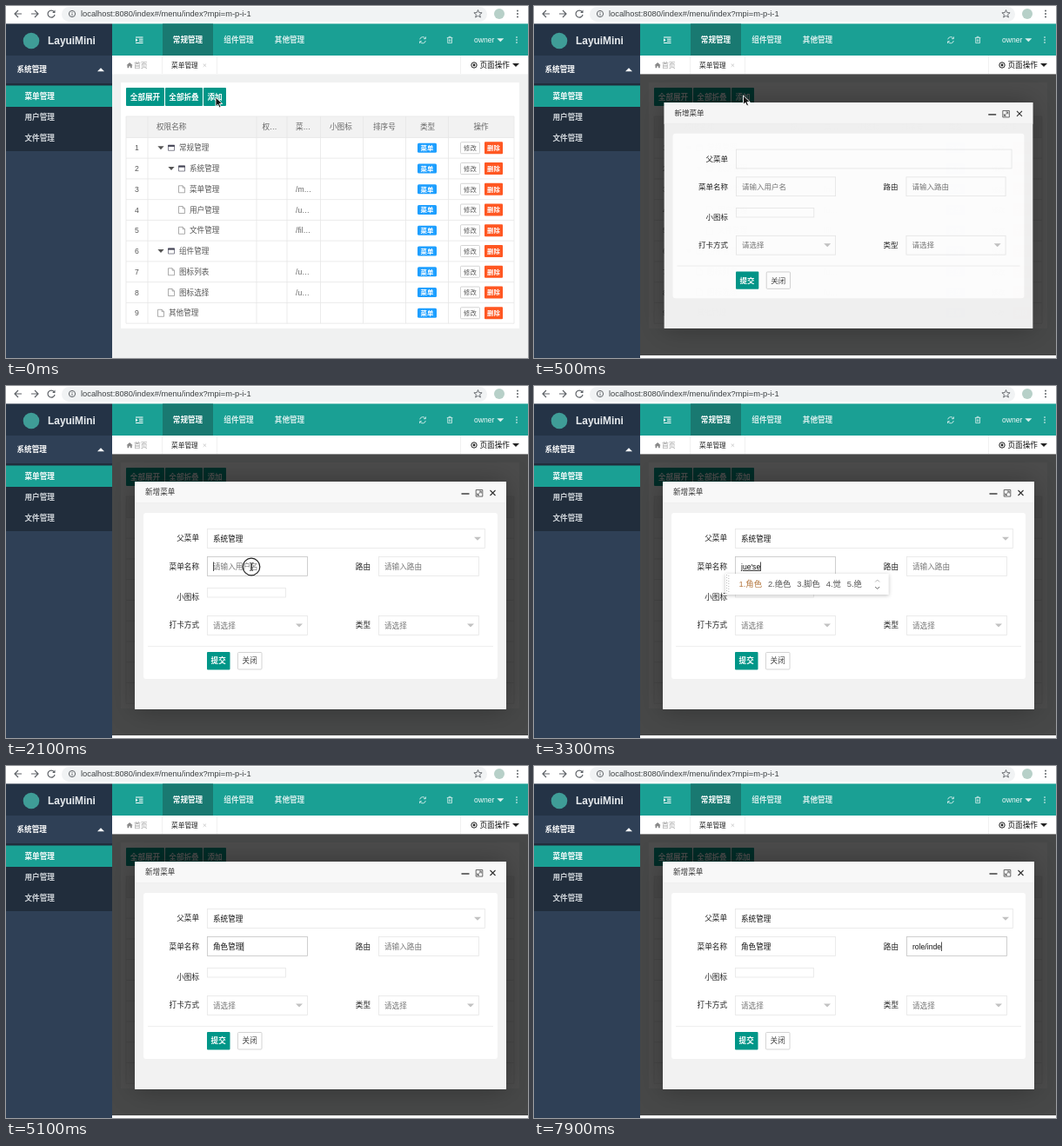
These frames come from a looping animation (600x405 px, 8 s). An HTML page:

```html
<!DOCTYPE html>
<html lang="zh-CN">
<head>
<meta charset="utf-8">
<title>菜单管理</title>
<style>
html, body { margin: 0; width: 100%; height: 100%; overflow: hidden; background: #fff; }
svg { display: block; width: 100vw; height: 100vh; }
text { font-family: "Liberation Sans", "Noto Sans CJK SC", "Noto Sans CJK", sans-serif; white-space: pre; }
.shadow { filter: drop-shadow(0 0 15px rgba(0,0,0,.3)); }
.soft { filter: drop-shadow(0 1px 2px rgba(0,0,0,.25)); }
</style>
</head>
<body>
<svg id="stage" viewBox="0 0 600 405"></svg>
<script>
const TEAL = '#009688', HEAD = '#1aa094', GREY = '#757575', LINE = '#e6e6e6';
const LOOP = 8000;

// Drawing helpers; text y is the middle of the line
const rect = (x, y, x2, y2, fill, more = '') =>
  `<rect x="${x}" y="${y}" width="${x2 - x}" height="${y2 - y}" fill="${fill}" ${more}/>`;
const box = (x, y, x2, y2, stroke = LINE, more = '') =>
  rect(x + .5, y + .5, x2 - .5, y2 - .5, '#fff', `stroke="${stroke}" stroke-width=".8" ${more}`);
const text = (x, y, s, fill = '#333', size = 8.6, more = '') =>
  `<text x="${x}" y="${y + size * .37}" fill="${fill}" font-size="${size}" ${more}>${s}</text>`;
const path = (d, stroke, width = 1, fill = 'none', more = '') =>
  `<path d="${d}" stroke="${stroke}" stroke-width="${width}" fill="${fill}" ${more}/>`;
const dot = (x, y, r, fill, more = '') => `<circle cx="${x}" cy="${y}" r="${r}" fill="${fill}" ${more}/>`;
const down = (x, y, fill, w = 4, h = 4) => path(`M${x - w} ${y - h / 2}h${2 * w}l${-w} ${h}z`, 'none', 0, fill);
const group = (id, inner, more = '') => `<g id="${id}" ${more}>${inner}</g>`;
const BOLD = ' font-weight="bold"', MID = 'text-anchor="middle"', END = 'text-anchor="end"';

// name, depth, is folder, route
const tree = [
  ['常规管理', 0, 1], ['系统管理', 1, 1], ['菜单管理', 2, 0, '/m…'], ['用户管理', 2, 0, '/u…'],
  ['文件管理', 2, 0, '/fil…'], ['组件管理', 0, 1], ['图标列表', 1, 0, '/u…'],
  ['图标选择', 1, 0, '/u…'], ['其他管理', 0, 0]
];

function browser() {
  const ink = '#5f6368';
  return rect(0, 0, 600, 20.4, '#fff') + rect(64, 1, 553, 18, '#f1f3f4', 'rx="8.5"') +
    path('M18 9h-8m4-4l-4 4 4 4', ink, 1.2) + path('M29 9h8m-4-4l4 4-4 4', ink, 1.2) +
    path('M55.2 6.6a4 4 0 1 0 .8 3.2', ink, 1.2) + path('M56.5 4.5v3.4h-3.4z', 'none', 0, ink) +
    dot(76, 9, 3.6, 'none', `stroke="${ink}"`) + path('M76 8.5v2.6m0-4.2v1', ink, .9) +
    text(86, 9, 'localhost:8080/index#/menu/index?mpi=m-p-i-1', '#3c4043', 9.3) +
    path('M0-4.5L1.3-1.4 4.6-1.2 2 .9 2.9 4.1 0 2.3-2.9 4.1-2 .9-4.6-1.2-1.3-1.4Z', ink, .9, 'none', 'transform="translate(542.5 9)"') +
    dot(567, 9, 6, '#b7d0c8') + [5.5, 9, 12.5].map(y => dot(588, y, 1, ink)).join('');
}

function header() {
  const pale = '#d8efed';
  return rect(0, 20.4, 122, 57, '#243346') + dot(29, 40, 9.3, '#3f9d97') +
    text(48, 39.5, 'LayuiMini', '#e9edf0', 11.9, BOLD) +
    rect(122, 20.4, 600, 57, HEAD) + rect(180, 20.4, 238, 57, '#197971') +
    path('M149 36h8.5m-4.5 2.2h4.5m-4.5 2.1h4.5m-8.5 2.2h8.5', '#fff', 1) +
    path('M149 37.3v4l2.6-2z', 'none', 0, '#fff') +
    ['常规管理', '组件管理', '其他管理'].map((s, i) =>
      text(209 + 58.5 * i, 39, s, i ? pale : '#fff', 8.6, MID + BOLD)).join('') +
    path('M475.7 38.4a3.4 3.4 0 0 1 6.2-1.2m.4 2.8a3.4 3.4 0 0 1-6.2 1.3M482.4 35.4v2.3h-2.3m-4.5 5.3v-2.3h2.3', pale, .9) +
    path('M506.8 36.6h6.6m-4.4 0v-1.3h2.2v1.3m-3.5 0v6h4.8v-6m-3.2 1.6v3m1.6-3v3', pale, .8) +
    text(538, 39, 'owner', '#eef8f7') + down(568.3, 39.3, pale) +
    [36, 39, 42].map(y => dot(587, y, .8, '#fff')).join('');
}

function sidebar() {
  return rect(0, 57, 122, 405, '#2f4056') + rect(0, 89, 122, 167, '#212d3c') + rect(0, 91.5, 122, 116, HEAD) +
    text(12.5, 73, '系统管理', '#fff', 8.6, BOLD) + path('M105 75.2h8l-4-4z', 'none', 0, '#fff') +
    ['菜单管理', '用户管理', '文件管理'].map((s, i) =>
      text(21.5, 103.5 + 24.3 * i, s, i ? '#d3d8dd' : '#fff', 8.6, BOLD)).join('');
}

function tabs() {
  return rect(122, 57, 600, 78.4, '#fff') +
    path('M138.5 68.3l3.6-3.2 3.6 3.2h-1v2.9h-1.8v-2h-1.6v2h-1.8v-2.9z', 'none', 0, '#888') +
    text(147, 68, '首页', '#999', 7.8) + text(190, 68, '菜单管理', '#222', 7.7) +
    path('M226.7 66.5l3.4 3.4m0-3.4l-3.4 3.4', '#c4c4c4', .8) +
    path('M179.5 57v21M242.5 57v21M522.5 57v21', '#eee', .8) +
    dot(538, 68, 3.2, 'none', 'stroke="#222"') + dot(538, 68, 1.4, '#222') +
    text(544.5, 68, '页面操作', '#111') + down(586, 68, '#222');
}

function table() {
  const top = 151.4, step = 23.75, ends = top + 9 * step;
  let s = rect(138, 127, 584, top, '#f2f2f2');
  for (let i = 0; i <= 9; i++) s += path(`M138 ${top + i * step}h446`, LINE, .8);
  s += path([138, 163, 288, 323, 361.5, 410.5, 459.5, 508.5, 584].map(x => `M${x} 127V${ends}`).join('') + 'M138 127h446', LINE, .8);
  [['权限名称', 173], ['权…', 294.5], ['菜…', 333], ['小图标', 372], ['排序号', 422], ['类型', 476], ['操作', 537.5]]
    .forEach(([n, x]) => s += text(x, 139, n, '#666'));
  tree.forEach(([name, depth, folder, route], i) => {
    const y = top + step * (i + .5), x = 178 + 12 * depth;
    s += text(150.5, y, i + 1, '#555', 8.6, MID);
    if (folder) {
      s += down(x, y, '#555', 3.6) + path(`M${x + 8.5} ${y - 3}h7v6h-7z`, '#667', .8) + rect(x + 8.2, y - 3.4, x + 15.8, y - 1.4, '#445');
    } else {
      s += path(`M${x - 3.5} ${y - 4}h4.6l2.4 2.4v5.6h-7zm4.6 0v2.4h2.4`, '#8a8a8a', .7);
    }
    s += text(x + (folder ? 21 : 9), y, name, '#555') + text(333, y, route || '', '#666') +
      rect(473, y - 5.5, 495, y + 5.5, '#1e9fff', 'rx="1.5"') + text(484, y, '菜单', '#fff', 7.4, MID + BOLD) +
      box(522, y - 7, 545, y + 7, '#c9c9c9', 'rx="1"') + text(533.5, y, '修改', '#555', 7.4, MID) +
      rect(550, y - 7, 571, y + 7, '#ff5722', 'rx="1"') + text(560.5, y, '删除', '#fff', 7.4, MID + BOLD);
  });
  return s;
}

function page() {
  return rect(122, 78, 600, 405, '#f0f1f1') + rect(132, 88, 590, 371, '#fff') +
    [['全部展开', 138, 182], ['全部折叠', 183, 226], ['添加', 227, 253]].map(([n, a, b]) =>
      rect(a, 94, b, 115, TEAL, 'rx="1"') + text((a + b) / 2, 104.5, n, '#fff', 8.6, MID + BOLD)).join('') + table();
}

function dropdown() {
  let s = rect(231.5, 198, 551.5, 346.5, '#fff', 'class="soft" stroke="#d2d2d2" stroke-width=".8"') +
    box(235, 206, 548, 227) + text(241, 216, '搜索', GREY) +
    path('M232 231.5h319', '#888', .7, 'none', 'stroke-dasharray="2 1.5"');
  tree.forEach(([name, depth, folder], i) => {
    const y = 240 + 11.7 * i, x = 239 + 11 * depth;
    s += folder
      ? down(x, y, '#555', 2.8, 3.4) + path(`M${x + 8} ${y - 3.5}h3l1 1.2h4.5v5.8h-8.5z`, '#dcc565', .6, '#f8e695')
      : path(`M${x + 8.5} ${y - 4}h4l2.2 2.2v5.6h-6.2z`, '#7d9cb8', .7, '#f3f9ff') + rect(x + 11, y, x + 14.2, y + 3, '#8fbce0');
    s += text(x + 18, y, name, '#333');
  });
  return s;
}

function dialog() {
  const labels = [['父菜单', 222, 175], ['菜单名称', 222, 207.5], ['路由', 419, 207.5],
    ['小图标', 222, 243], ['打卡方式', 222, 275], ['类型', 419, 275]];
  return rect(148, 110, 575, 372, '#f2f2f2', 'class="shadow"') + rect(148, 110, 575, 134.5, '#f8f8f8') +
    path('M148 134.5h427', '#eee', .8) + text(160, 122, '新增菜单') +
    path('M523.5 124h9', '#333', 1.4) +
    path('M540.2 119.5h7.6v7.6h-7.6zm1.8 5.8l4-4m-2.2-.2h2.4v2.4m-4.4-.2v2.2h2.2', '#444', .8) +
    path('M556.5 120l6 6m0-6l-6 6', '#333', 1.1) +
    rect(158, 146, 565, 337, '#fff', 'rx="3"') +
    labels.map(([s, x, y]) => text(x, y, s, '#222', 8.6, END)).join('') +
    box(231, 164, 551, 187) + box(231, 196, 347, 219, LINE, 'id="edge0"') +
    box(428, 196, 544, 219, LINE, 'id="edge1"') + box(231, 232, 322, 243.5) +
    [231, 428].map(x => box(x, 264, x + 116, 287) + text(x + 7, 275.5, '请选择', GREY) + down(x + 106, 275.5, '#c2c2c2')).join('') +
    group('picker', text(238, 175.5, '', '#555', 8.6, 'id="parent"') +
      group('arrow', down(542, 175.8, '#c2c2c2'))) +
    [238, 435].map((x, i) => `<text id="field${i}" x="${x}" y="210.9" font-size="8.6"></text>`).join('') +
    rect(0, 202.5, .8, 213, '#222', 'id="caret"') +
    path('M163 299.5h397', '#eee', .9) +
    rect(231, 306, 257.5, 326.5, TEAL, 'rx="1"') + text(244.2, 316, '提交', '#fff', 8.6, MID + BOLD) +
    box(266, 306, 294.5, 326.5, '#c9c9c9', 'rx="1"') + text(280.2, 316, '关闭', '#444', 8.6, MID) +
    group('drop', dropdown());
}

const pointers =
  group('point', path('M0 0v10.5l2.5-2.3 1.7 3.8 1.9-.8-1.7-3.7h3.4z', '#fff', .9, '#111')) +
  group('hand', path('M-1.5-5q1.1-1 2 0v3.6l3.5.8q1.2.4 1 1.8l-.9 3.9h-5l-3.3-4.2q.6-1.3 2.7.4z', '#222', .8, '#fff')) +
  group('beam', path('M-1.8-4.5q1.8 0 1.8 1.2v6.6q0 1.2-1.8 1.2M1.8-4.5q-1.8 0-1.8 1.2v6.6q0 1.2 1.8 1.2', '#222', .9)) +
  dot(0, 0, 9.8, 'none', 'id="ring" stroke="#222" stroke-width="1.2"');

const $ = id => document.getElementById(id);
$('stage').innerHTML = page() + rect(122, 402, 600, 405, '#fff', 'id="foot"') +
  rect(122, 78, 600, 402, '#000', 'id="shade" opacity=".7"') + group('dialog', dialog()) +
  browser() + header() + sidebar() + tabs() + group('ime', '') + group('pointer', pointers);

// time, field, settled text, text being composed, candidates
const keys = [
  [0, -1, '', ''],
  [2030, 0, '', ''],
  [2500, 0, '', 'j', '就 将 及 叫 家'],
  [2600, 0, '', 'ju', '据 局 句 举 具'],
  [2800, 0, '', 'jue', '觉 绝 决 角 掘'],
  [3000, 0, '', "jue's", '角色 绝色 决赛 觉 绝'],
  [3200, 0, '', "jue'se", '角色 绝色 脚色 觉 绝'],
  [3500, 0, '角色', ''],
  [3800, 0, '角色', 'g', '个 给 过 高 该'],
  [4000, 0, '角色', 'gu', '古 股 故 顾 骨'],
  [4100, 0, '角色', 'gua', '挂 瓜 刮 寡 卦'],
  [4200, 0, '角色', 'guan', '管 关 观 官 guano'],
  [4500, 0, '角色', "guan'l", '管理 官僚 关了 关联 管'],
  [4600, 0, '角色', "guan'li", '管理 关里 官吏 惯例 管'],
  [4800, 0, '角色管理', ''],
  [5200, 1, '', ''],
  [5500, 1, '', 'r', '人 让 如 然 日'],
  [5600, 1, '', 'ro', '肉 柔 揉 容 日哦'],
  [5800, 1, '', "ro'l", '揉了 融了 肉类 荣乐 日哦了'],
  [5900, 1, '', "ro'le", '揉了 融了 role 荣乐 日哦了'],
  [6200, 1, 'role', ''],
  [7000, 1, 'role/', ''], [7500, 1, 'role/i', ''], [7600, 1, 'role/in', ''],
  [7700, 1, 'role/ind', ''], [7900, 1, 'role/inde', '']
];
const hints = ['请输入用户名', '请输入路由'];
const track = [[0, 241, 105], [200, 240.5, 103], [550, 240.5, 103], [950, 290, 182], [1250, 290, 182],
  [1520, 284, 246], [1700, 284, 246], [2000, 282, 208], [LOOP, 282, 208]];

const part = (t, start, length) => Math.min(1, Math.max(0, (t - start) / length));
const ease = x => 1 - (1 - x) ** 2.3;
const set = (id, name, value) => $(id).setAttribute(name, value);
const show = (id, on) => { $(id).style.display = on ? '' : 'none'; };
const within = (t, a, b) => t >= a && t < b;

function showIme(x, words) {
  let at = x + 12.5, s = '';
  words.split(' ').forEach((w, i) => {
    s += text(at, 228, `${i + 1}.${w}`, i ? '#555' : '#b5783f', 9.4);
    at += 14.6 + w.length * (/[a-z]/.test(w) ? 4.65 : 9.4);
  });
  at += 11;
  $('ime').innerHTML = rect(x - 3, 216, at + 13, 240, '#fff', 'class="soft"') +
    path(`M${x - 1.5} 217v22M${x + .8} 218v20`, '#bbb', 1, 'none', 'stroke-dasharray="1 2"') + s +
    path(`M${at - 2.5} 225.5l2.5-2.5 2.5 2.5`, '#aaa', .9) + path(`M${at - 2.5} 231l2.5 2.5 2.5-2.5`, '#555', .9);
}

let lastKey;
function typeFields(t) {
  const key = keys.filter(k => k[0] <= t).pop();
  const [since, active, done, draft, words] = key;
  if (key !== lastKey) {
    lastKey = key;
    $('ime').innerHTML = '';
    hints.forEach((hint, i) => {
      const on = i === active;
      const value = on ? done : i < active ? '角色管理' : '';
      const composing = on ? draft : '';
      const filled = value + composing;
      $('field' + i).innerHTML = filled ? `${value}<tspan text-decoration="underline">${composing}</tspan>` : hint;
      set('field' + i, 'fill', filled ? '#111' : GREY);
      set('edge' + i, 'stroke', on ? '#c4c4c4' : LINE);
    });
    if (active >= 0) {
      const left = active ? 435 : 238;
      const width = done + draft ? $('field' + active).getComputedTextLength() : 0;
      set('caret', 'x', left + width);
      if (words) showIme(left + 8.6 * done.length - 15, words);
    }
  }
  show('caret', active >= 0 && Math.floor((t - since) / 500) % 2 === 0);
}

function movePointer(t) {
  const i = track.findIndex(k => k[0] > t);
  const [t0, x0, y0] = track[i - 1], [t1, x1, y1] = track[i];
  let p = part(t, t0, t1 - t0);
  p = p * p * (3 - 2 * p);
  set('pointer', 'transform', `translate(${x0 + (x1 - x0) * p} ${y0 + (y1 - y0) * p})`);
  show('pointer', t < 2400);
  show('point', t < 850);
  show('hand', within(t, 850, 1850));
  show('beam', t >= 1850);
  show('ring', within(t, 100, 250) || within(t, 930, 1050) || within(t, 1580, 1680) || within(t, 2030, 2200));
}

function draw(now) {
  const t = now % LOOP;
  const grow = ease(part(t, 250, 300)), scale = .5 + .5 * grow;
  for (const id of ['shade', 'foot', 'dialog']) show(id, t >= 250);
  set('dialog', 'opacity', grow);
  set('dialog', 'transform', `translate(361 241) scale(${scale}) translate(-361 -241)`);

  const open = ease(part(t, 1020, 300)), picked = t >= 1650;
  show('picker', t >= 550);
  show('drop', within(t, 1020, 1650));
  set('drop', 'opacity', .3 + .7 * open);
  set('drop', 'transform', `translate(0 ${9.2 - 18 * open})`);
  const turn = 180 * (open - ease(part(t, 1650, 300)));
  set('arrow', 'transform', `rotate(${turn} 542 175.8)`);
  $('parent').textContent = picked ? '系统管理' : '修改默认提示信息';
  set('parent', 'fill', picked ? '#111' : '#555');

  typeFields(t);
  movePointer(t);
}

const begin = performance.now();
function tick() {
  draw(performance.now() - begin);
  requestAnimationFrame(tick);
}
tick();
</script>
</body>
</html>
```
